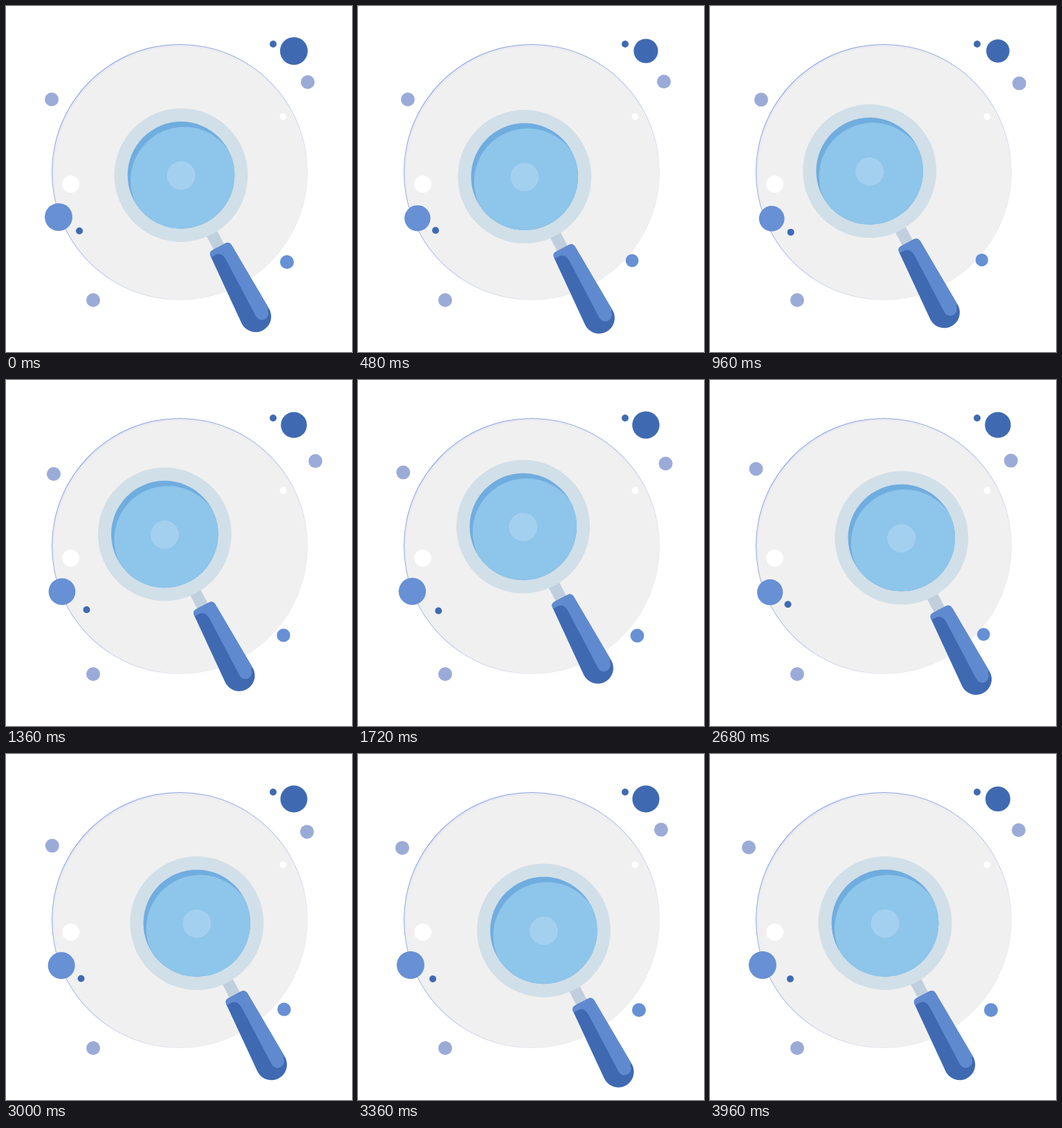
Write an HTML page that moves like this. It is 500 px wide and 500 px high and loops after 4000 ms.

```html
<!DOCTYPE html>
<html lang="en">
<head>
<meta charset="utf-8">
<title>Searching</title>
<style>
  html, body { margin: 0; width: 100%; height: 100%; overflow: hidden; background: #fff; }
  svg { display: block; width: 100vw; height: 100vh; }
  .dark { fill: #3f6ab2; }
  .mid { fill: #6790d5; }
  .pale { fill: #9babd8; }
</style>
</head>
<body>
<svg viewBox="0 0 500 500">
  <defs>
    <linearGradient id="rim" x1="0.1" y1="0.1" x2="0.9" y2="0.9">
      <stop offset="0" stop-color="#7f98de"/>
      <stop offset="0.45" stop-color="#a9b8e6"/>
      <stop offset="0.8" stop-color="#e6e8f0"/>
      <stop offset="1" stop-color="#f0f0f0"/>
    </linearGradient>
    <linearGradient id="shade" x1="0.15" y1="0" x2="0.6" y2="0.7">
      <stop offset="0" stop-color="#e5e7f2"/>
      <stop offset="0.7" stop-color="#f0f0f0"/>
    </linearGradient>
    <clipPath id="glass"><circle r="77.3"/></clipPath>
    <path id="grip" d="M-17 124Q-17 117 -10 117H10Q17 117 17.5 124L22.5 231A22.5 22.5 0 0 1 -22.5 231Z"/>
    <clipPath id="gripClip"><use href="#grip"/></clipPath>
  </defs>

  <circle cx="251" cy="240" r="185" fill="url(#rim)"/>
  <circle cx="251" cy="240" r="184" fill="url(#shade)"/>
  <circle cx="251.3" cy="240.6" r="182" fill="#f0f0f0"/>
  <circle cx="93.5" cy="257.5" r="12.5" fill="#fff"/>
  <circle cx="400.5" cy="160" r="5" fill="#fff"/>

  <circle class="dark" cx="386" cy="55" r="5"/>
  <circle class="pale" cx="126" cy="425" r="10"/>
  <circle id="pulse" class="dark" cx="416" cy="65" r="20"/>
  <g id="pair" class="mid">
    <circle cx="76" cy="305" r="20"/>
    <circle cx="406" cy="370" r="10"/>
  </g>
  <circle id="leftDot" class="pale" r="10"/>
  <circle id="rightDot" class="pale" r="10"/>
  <circle id="smallDot" class="dark" r="5"/>

  <g id="magnifier">
    <g transform="rotate(-27.8)">
      <path fill="#c0cfdd" d="M-8.5 90H8.5V125H-8.5Z"/>
      <use href="#grip" class="dark"/>
      <path clip-path="url(#gripClip)" fill="#608ad0"
        d="M-20 125H-10Q0 125 0.5 138V231A9.5 9.5 0 0 0 19.5 231L23 228L25 110H-25Z"/>
    </g>
    <circle r="96.5" fill="#d1dfe8"/>
    <circle r="77.3" fill="#70addf"/>
    <g clip-path="url(#glass)"><circle cx="4.5" cy="7.8" r="77.5" fill="#8ec5ea"/></g>
    <circle cy="0.6" r="20.5" fill="#a4d0ef"/>
  </g>
</svg>
<script>
const STEP = 40, LOOP = 4000;
const keyTimes = [0, 800, 1600, 2400, 3200, 3960];
const byId = id => document.getElementById(id);

// Smooth curve through the points, one path per segment for constant speed within it.
function curveThrough(points) {
  const last = points.length - 1;
  const handle = (i, axis) =>
    i === 0 || i === last ? 0 : (points[i + 1][axis] - points[i - 1][axis]) / 6;
  return points.slice(1).map((end, i) => {
    const start = points[i];
    const c1 = [0, 1].map(a => start[a] + handle(i, a));
    const c2 = [0, 1].map(a => end[a] - handle(i + 1, a));
    const path = document.createElementNS("http://www.w3.org/2000/svg", "path");
    path.setAttribute("d", `M${start}C${c1} ${c2} ${end}`);
    return { path, length: path.getTotalLength() };
  });
}

const movers = [
  ["magnifier", [[253, 244.4], [233, 244.4], [233, 214.4], [273, 214.4], [273, 254.4], [253, 244.4]]],
  ["leftDot", [[66, 135], [76, 135], [66, 135], [66, 125], [66, 135], [56, 135]]],
  ["rightDot", [[436, 110], [446, 110], [446, 120], [436, 120], [436, 110], [446, 110]]],
  ["smallDot", [[106, 325], [116, 325], [116, 335], [116, 325], [106, 325], [116, 325]]]
].map(([id, points]) => ({ node: byId(id), curve: curveThrough(points) }));

const pulseRadii = [20, 16, 20, 18, 20, 18];
const pairScales = [1, 0.9, 1, 0.9, 1, 1];

function draw(time) {
  let i = 0;
  while (i < 4 && time >= keyTimes[i + 1]) i++;
  const u = Math.min(1, (time - keyTimes[i]) / (keyTimes[i + 1] - keyTimes[i]));
  const mix = values => values[i] + (values[i + 1] - values[i]) * u;

  for (const { node, curve } of movers) {
    const { x, y } = curve[i].path.getPointAtLength(u * curve[i].length);
    node.setAttribute("transform", `translate(${x} ${y})`);
  }
  byId("pulse").setAttribute("r", mix(pulseRadii));
  byId("pair").setAttribute("transform",
    `translate(241 333) scale(${mix(pairScales)}) translate(-241 -333)`);
}

const began = performance.now();
function tick() {
  const time = (performance.now() - began) % LOOP;
  draw(Math.floor(time / STEP) * STEP);
  requestAnimationFrame(tick);
}
tick();
</script>
</body>
</html>
```
